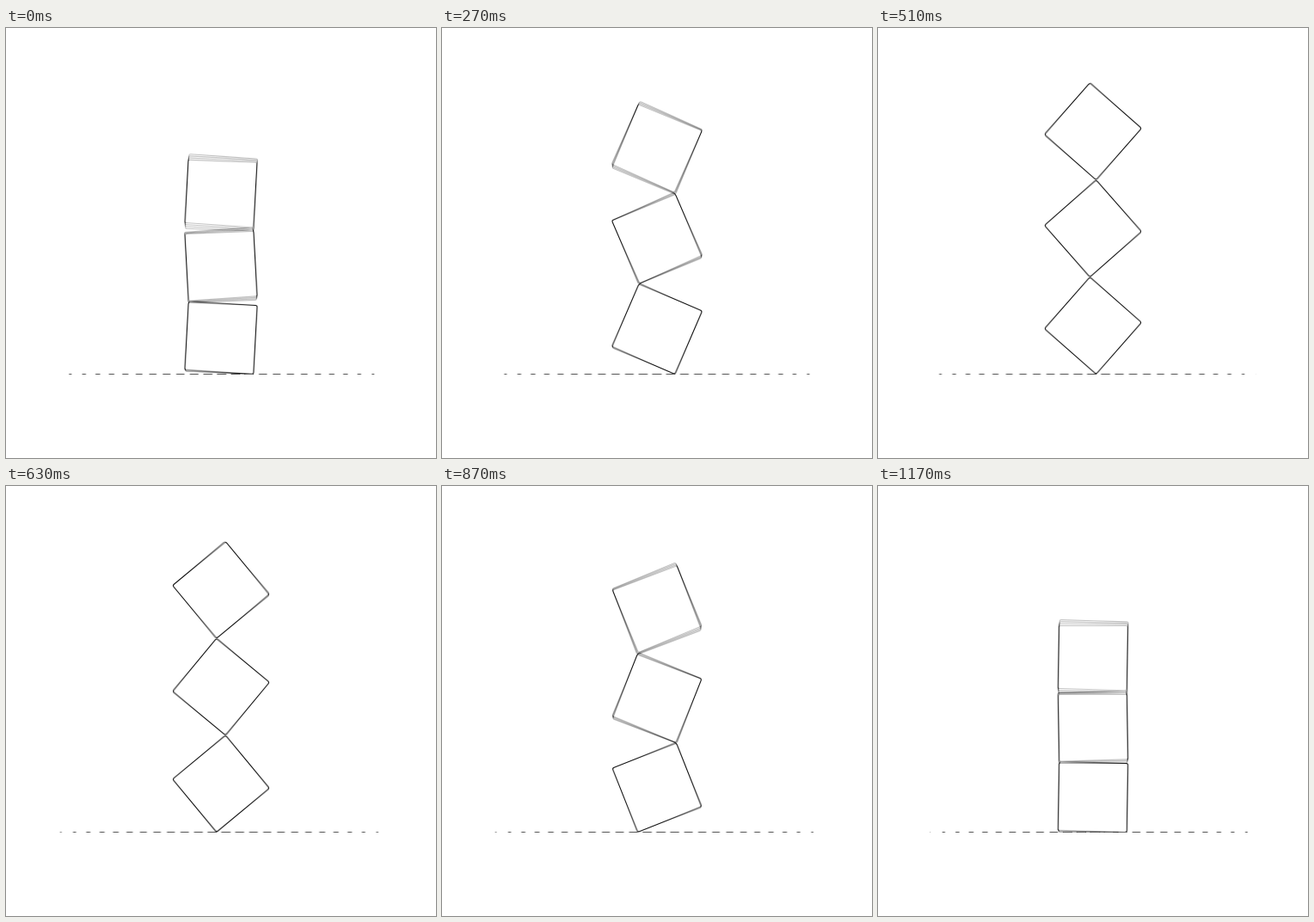
Recreate the animation shown at these times as an HTML page with a canvas. Size 500 px wide and 500 px high, loop 1.2 s.

```html
<!DOCTYPE html>
<html lang="en">
<head>
<meta charset="utf-8">
<title>Rolling tower</title>
<style>
  html, body { margin: 0; width: 100%; height: 100%; overflow: hidden; background: #fff; }
  canvas { display: block; width: 500px; height: 500px; }
</style>
</head>
<body>
<canvas id="stage" width="500" height="500"></canvas>
<script>
const ctx = document.getElementById('stage').getContext('2d');

const LOOP = 1200, STEP = 30, STEPS = LOOP / STEP;
const SAMPLES = 4;
const SIDE = 80, RADIUS = 2, MID = 250, GROUND = 402.5;
const GAP = 16, DASH = 11, REACH = 190, DASH_SHIFT = -5;
const QUARTER = Math.PI / 2;

function addSquare(y, angle) {
  const h = SIDE / 2, c = Math.cos(angle), s = Math.sin(angle);
  const at = (x, v) => [MID + x * c - v * s, y + x * s + v * c];
  const corners = [at(h, -h), at(h, h), at(-h, h), at(-h, -h)];
  ctx.moveTo(...at(0, -h));
  corners.forEach((p, i) => ctx.arcTo(...p, ...corners[(i + 1) % 4], RADIUS));
  ctx.closePath();
}

function addDashes(origin) {
  const first = Math.ceil((MID - REACH - origin) / GAP);
  for (let x = origin + first * GAP; x < MID + REACH; x += GAP) {
    const half = DASH / 2 * Math.sqrt(Math.max(0, 1 - Math.abs(x - MID) / REACH));
    ctx.moveTo(x - half, GROUND);
    ctx.lineTo(x + half, GROUND);
  }
}

function stroke(color, width, addPath) {
  ctx.strokeStyle = color;
  ctx.lineWidth = width;
  ctx.beginPath();
  addPath();
  ctx.stroke();
}

function drawPose(turn) {
  const angle = (turn % 1) * QUARTER;
  const c = Math.cos(angle), s = Math.sin(angle);
  const height = SIDE * (c + s);
  // The ground travels with the corner the tower pivots on.
  const pivot = MID + SIDE / 2 * (c - s);

  stroke('#555', 1, () => addDashes(pivot + DASH_SHIFT));
  stroke('#111', 1.1, () => {
    for (let i = 0; i < 3; i++) {
      addSquare(GROUND - height * (i + 0.5), i % 2 ? -angle : angle);
    }
  });
}

// Additive alpha gives an even average of the motion blur samples.
function render(ms) {
  const step = Math.floor((ms % LOOP) / STEP) + 1;
  ctx.clearRect(0, 0, 500, 500);
  ctx.globalCompositeOperation = 'lighter';
  ctx.globalAlpha = 1 / SAMPLES;
  for (let i = 0; i < SAMPLES; i++) {
    drawPose((step + i / SAMPLES) / STEPS);
  }
}

const start = performance.now();
function tick() {
  render(performance.now() - start);
  requestAnimationFrame(tick);
}
tick();
</script>
</body>
</html>
```
